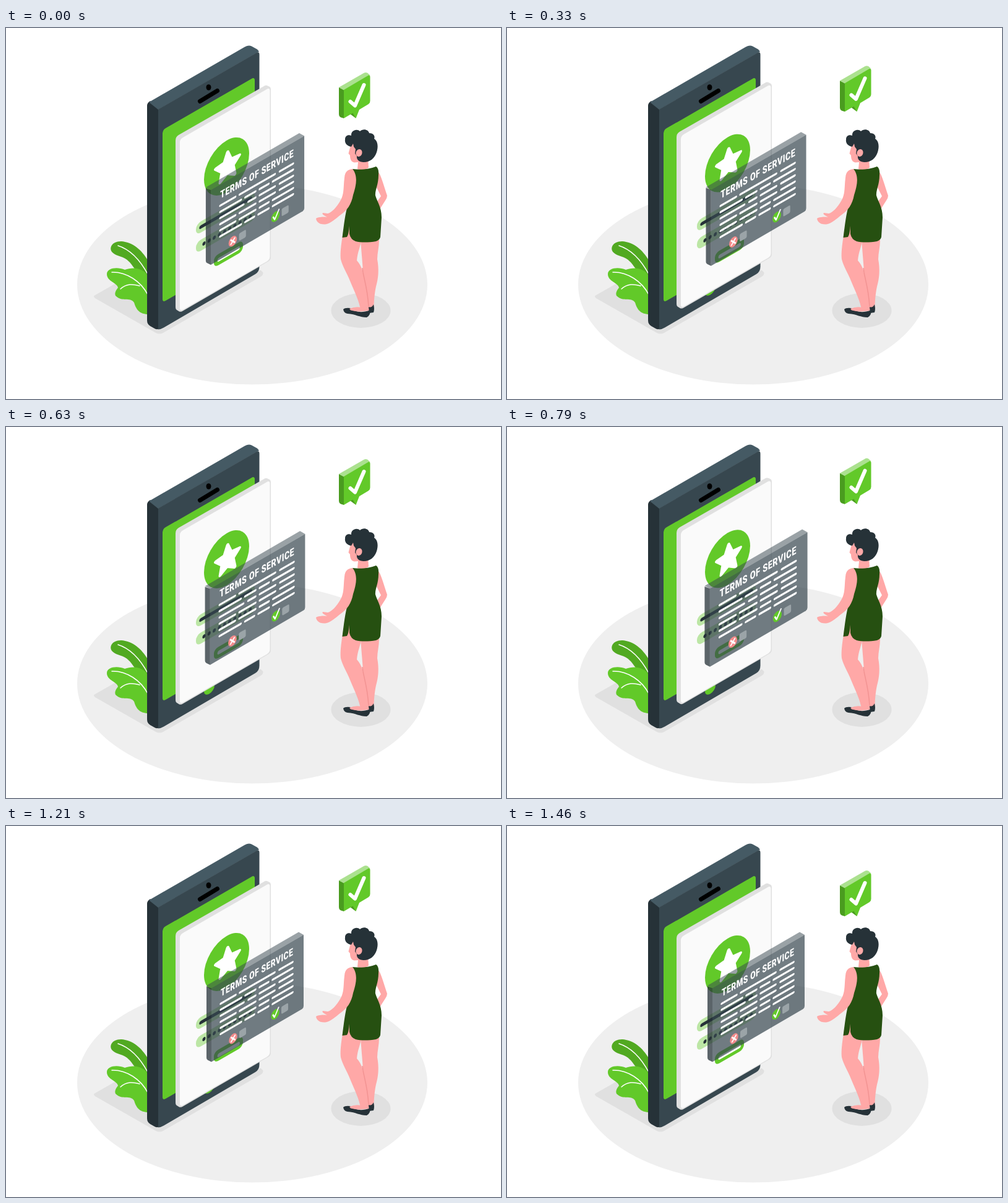
An HTML page that plays this animation: 800 by 600 pixels, repeating every 1.5 s.

```html
<!DOCTYPE html>
<html lang="en">
<head>
<meta charset="utf-8">
<title>Terms of service</title>
<style>
  html, body { margin: 0; width: 100%; height: 100%; overflow: hidden; background: #fff; }
  svg { display: block; width: 100vw; height: 100vh; }
  .line { fill: none; stroke: #fff; stroke-linecap: round; stroke-linejoin: round; }
  .title { font: 900 16.5px Roboto, sans-serif; letter-spacing: .6px; fill: #fff; }
  .green { fill: #62c929; }
  .dark { fill: #263238; }
  .slate { fill: #37474f; }
  .skin { fill: #ffa8a7; }
  .shade { fill: #e0e0e0; }
</style>
</head>
<body>
<svg viewBox="0 0 800 600">
  <!-- floor -->
  <ellipse cx="398" cy="415" rx="283" ry="161.5" fill="#efefef"/>
  <path class="shade" d="M144 432L230 383L412 392Q419 397 412 402L254 493Q248 496 242 493L144 437Q140 434 144 432Z"/>
  <ellipse class="shade" cx="573.5" cy="457" rx="48" ry="28"/>

  <!-- plant -->
  <path fill="#51a921" d="M230 377C219 358 204 346 186 345C170 345 166 357 172 363C179 370 190 368 199 378C206 385 210 396 230 410Z"/>
  <path class="green" d="M163 398C163 388 180 386 192 391C206 386 222 388 230 402V463C215 463 210 454 207 444C200 434 188 444 177 433C175 428 178 424 181 420C180 412 163 410 163 398Z"/>
  <path class="line" stroke-width="1.5" d="M181 352C200 358 216 374 229 398M171 395C195 394 218 410 229 431M185 422C195 413 205 414 216 417"/>

  <!-- phone -->
  <path class="dark" d="M228 126Q228 121 233 118L246 131V487Q243 487.500 241 486.500L233 482Q228 479 228 473Z"/>
  <path fill="#455a64" d="M231 120L386 30.500Q392 27 397 29.500L406 34.500L409 38L246 132Z"/>
  <path class="slate" d="M246 131.500L404 40.500Q409.500 37 409.500 43V386Q409.500 394 403 398L255 484.500Q251 487 246 487.500Z"/>
  <ellipse cx="327.500" cy="96" rx="4" ry="4.800"/>
  <path d="M313.500 118.500L341.500 101.500" stroke="#000" stroke-width="7" stroke-linecap="round"/>
  <rect class="green" transform="matrix(1 -.577 0 1 253 165)" width="149" height="279" rx="5"/>
  <ellipse class="green" transform="matrix(1 -.577 0 1 328.500 423)" rx="8.500" ry="8.500"/>

  <!-- floating login sheet -->
  <g id="sheet">
    <path class="shade" d="M274 182Q274 176 279 173L417 94Q420 92 423 93.500L426 95Q428 96 428 100V371Q428 375 424 377.500L285 458Q282 459.500 280 458.500L276 456Q274 455 274 451Z"/>
    <rect fill="#fafafa" transform="matrix(1 -.577 0 1 281 180)" width="145.500" height="278.500" rx="5"/>
    <g transform="matrix(1 -.577 0 1 356.500 224)">
      <ellipse class="green" rx="36.500" ry="42"/>
      <polygon id="star" fill="#fff" stroke="#fff" stroke-width="5" stroke-linejoin="round"/>
    </g>
    <g transform="matrix(1 -.577 0 1 307 326.500)">
      <g class="green" opacity=".4">
        <rect y="-9" width="95" height="18" rx="8"/>
        <rect y="20.500" width="95" height="18" rx="8"/>
      </g>
      <path d="M8 0H88" stroke="#263238" stroke-width="5.500" stroke-linecap="round"/>
      <g id="dots" class="dark"></g>
      <rect class="green" x="29" y="60" width="47" height="18" rx="7"/>
      <path class="line" stroke-width="6" d="M37.500 69.500H68"/>
    </g>
  </g>

  <!-- terms panel -->
  <g id="panel">
    <path class="dark" opacity=".75" d="M324 259L332 262V381.500L326 378.500Q324 377.500 324 375Z"/>
    <path class="slate" opacity=".5" d="M324 258L473 171.500L481 176L332 262Z"/>
    <path class="slate" opacity=".7" d="M332 262L481 176V291Q481 294.500 478.500 296L332 381.500Z"/>
    <text class="title" transform="matrix(.735 -.424 0 1 347 276)">TERMS OF SERVICE</text>
    <g transform="matrix(1 -.577 0 1 332 262)">
      <path id="copy" class="line" stroke-width="3.500"/>
      <g fill="#9ba4a8">
        <rect x="45" y="95.500" width="11" height="12" rx="2"/>
        <rect x="113" y="95.500" width="11" height="12" rx="2"/>
      </g>
      <ellipse cx="35" cy="102" rx="6.700" ry="7.800" fill="#f28b8b"/>
      <ellipse class="green" cx="103" cy="102" rx="6.700" ry="7.800"/>
      <path class="line" stroke-width="2.200" d="M32 98.500L38 105.500M38 98.500L32 105.500M99.500 101L102 106L108.500 94"/>
    </g>
  </g>

  <!-- woman -->
  <g class="skin">
    <path d="M601 232C606 238 608 247 616 271Q616 275 613 279L604 293L598 283L606 272L596 252Z"/>
    <path d="M573 343H603C603 354 600 364 600 374C603 390 602 404 598 418C595 432 595 442 594 456H582Z"/>
    <path d="M545 330C541 352 540 366 541 374C544 386 551 396 556 409C564 428 571 442 573 456H586C587 442 585 425 580 411C577 396 576 386 567 376C568 362 573 354 574 343L555 318Z"/>
  </g>
  <path d="M576 388C577 402 584 418 586 450" fill="none" stroke="#f29392" stroke-width="1.500"/>
  <path class="dark" d="M586 451Q591 453 594 447Q596 455 594 460L587 461Z"/>
  <path class="dark" d="M545 455Q548 452 556 453Q564 460 577 459Q585 458 588 456Q590 464 583 468C571 468 566 463 552 462Q546 461 545 455Z"/>
  <path class="skin" d="M555 454Q565 450 574 452L586 450V457Q570 460 557 456.500Z"/>
  <path class="skin" d="M558 187L555 197L553.500 203L556 206C556 212 558 217 563 217.500L569 217L568 228Q577 232 586 226L585 210L580 185Z"/>
  <path class="dark" d="M558 192C551 191 547 186 548 180C548 174 553 172 558 174C557 166 567 162 572 167C577 162 586 164 587 170C594 170 597 175 595 179C601 183 602 192 599 201C596 210 589 217 578 217C571 217 566 213 567 207L564 203L565 196L562 192L561 187Z"/>
  <ellipse class="skin" cx="570.500" cy="202" rx="5" ry="6" transform="rotate(20 570.500 202)"/>
  <path fill="#265011" d="M560 228C574 230 588 228 598 224Q603 227 602 238C602 254 596 262 597 271C600 281 607 290 607 306L605 338Q604 343 598 345C586 347 573 347 565 345Q557 342 555 333V320Q554 334 551 338L543.500 339C546 320 548 300 553 284C557 264 566 248 560 228Z"/>
  <path class="skin" d="M560 228C552 229 548 232 547 242C545 257 547 269 540 280C534 290 526 299 520 300L512 299Q510 301 514 303L519 306C512 305 503 306 501 308C502 315 508 318 516 317.500C525 316 532 309 541 302C551 295 558 286 561 270C565 257 570 240 560 228Z"/>

  <!-- speech bubble -->
  <g id="bubble">
    <path fill="#4a9c1f" d="M538 96L546 100V146L541 144.500Q538 143 538 139ZM556 139L562 136L565.500 146Z"/>
    <path fill="#abe18f" d="M538 96L578 73Q581 71 584 72.500L588 76L546 100.500Z"/>
    <path class="green" d="M546 100L585 77Q588.500 75 588.500 79V118Q588.500 121 586 123L571 132L565.500 146L560.500 137.500L546 146Z"/>
    <path class="line" stroke-width="6" d="M556.500 119L564 125.500L578.500 92"/>
  </g>
</svg>
<script>
  const $ = id => document.getElementById(id);

  $('star').setAttribute('points', Array.from({ length: 10 }, (_, i) => {
    const r = i % 2 ? 11 : 23.5, a = i * Math.PI / 5;
    return [r * Math.sin(a) * 0.866 + 1.5, 1 - r * Math.cos(a)];
  }).join(' '));

  $('dots').innerHTML = Array.from({ length: 10 }, (_, i) =>
    `<ellipse cx="${13 + 8.3 * i}" cy="29.5" rx="2.6" ry="3"/>`).join('');

  // Each row lists the start and end of its strokes.
  const rows = [
    [15, 39, 46, 102, 110, 131],
    [15, 48, 46, 71, 78, 92, 99, 131].map((x, i) => i === 1 ? 39 : x),
    [15, 52, 60, 71, 78, 102, 110, 131],
    [15, 39, 46, 71, 78, 102, 110, 131],
    [15, 39, 46, 71, 78, 92, 99, 131],
    [15, 48, 55, 69, 76, 92, 99, 131]
  ];
  rows[1] = [15, 48, 55, 71, 78, 92, 99, 131];
  $('copy').setAttribute('d', rows.map((row, r) =>
    row.map((x, i) => (i % 2 ? 'H' + x : `M${x} ${33.8 + 9.8 * r}`)).join('')).join(''));

  const FPS = 24, FRAMES = 36;
  const beat = [[0, 1], [0.1, 1.1], [0.3, 1], [0.4, 1], [0.5, 1.1], [0.6, 1], [1, 1]];

  function beatScale(p) {
    const i = beat.findIndex(key => key[0] > p);
    const [p0, s0] = beat[i - 1], [p1, s1] = beat[i];
    return s0 + (s1 - s0) * (p - p0) / (p1 - p0);
  }

  function draw(now) {
    const p = (Math.floor((now + 5) * FPS / 1000) % FRAMES + 0.5) / FRAMES;
    const lift = 1 - Math.abs(1 - 2 * p);
    $('sheet').setAttribute('transform', `translate(0 ${0.3 - 12 * lift})`);
    $('bubble').setAttribute('transform', `translate(0 ${0.7 - 24 * lift})`);
    $('panel').setAttribute('transform',
      `translate(402.5 276) scale(${beatScale(p)}) translate(-402.5 -276)`);
    requestAnimationFrame(draw);
  }
  draw(performance.now());
</script>
</body>
</html>
```
